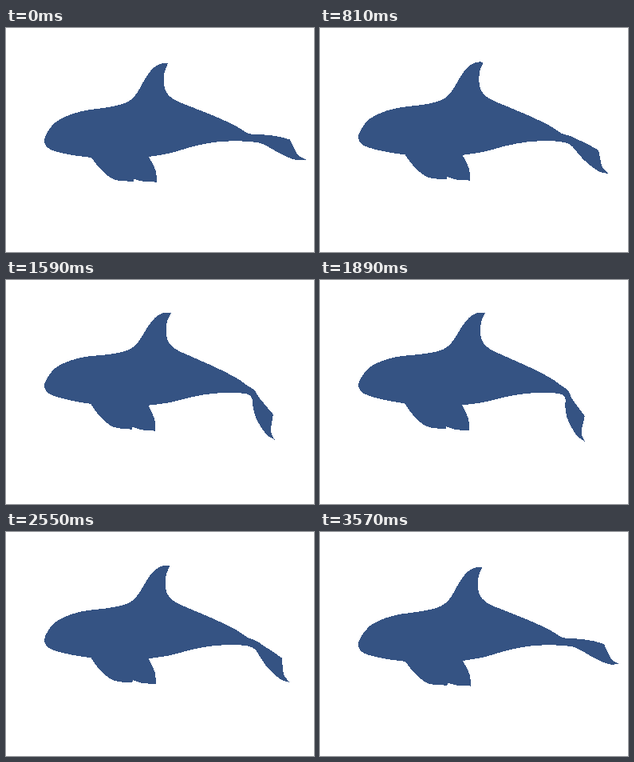
Animation of 386x280 px, one loop 3600 ms. Source, as an HTML page:

```html
<!DOCTYPE html>
<html lang="en">
<head>
<meta charset="utf-8">
<title>Swimming whale</title>
<style>
  html, body { margin: 0; width: 100%; height: 100%; overflow: hidden; background: #fff; }
  svg { display: block; width: 386px; height: 280px; }
</style>
</head>
<body>
<svg viewBox="0 0 386 280"><path id="whale" fill="#355383" shape-rendering="crispEdges"/></svg>
<script>
const LOOP = 3600;

// Key points at rest. Each run is smooth and ends at the corner where the next one starts.
const RUNS = [
  // fin, head and chin
  "203,44.3 193,45 183,51.5 174,64 165,80 156,90 143,95.8 122,100 102,102.7 82,107.8 62,118 51,132 48.2,143 56,152 80,158.3",
  // flipper
  "107,162 119,177 136,189.5",
  "159.5,191.8 160,188.5",
  "160,188.5 172,191.8",
  "189,192.6 187.5,178",
  // belly and underside of the tail
  "179,161 205,156.5 235,148 260,143 285,141.3 303,142 317,143.5 327,147.5 340,155 352,161 364,165",
  // fluke edge
  "375.7,164.5 366,159 361,150",
  // tail and back
  "356,139.5 342,135.8 328,133.8 316,133 303,131.5 288,122.5 262,110.5 232,98.5 210,89 199.5,77 198.2,58"
].map(run => run.split(" ").map(point => point.split(",").map(Number)));

function smoothstep(from, to, x) {
  const k = Math.min(1, Math.max(0, (x - from) / (to - from)));
  return k * k * (3 - 2 * k);
}

function rotate([x, y], [px, py], angle) {
  const c = Math.cos(angle), s = Math.sin(angle), dx = x - px, dy = y - py;
  return [px + dx * c - dy * s, py + dx * s + dy * c];
}

// The body tilts slightly while the tail swings down; the joint blends both turns.
function pose(point, u) {
  const weight = smoothstep(296, 336, point[0]);
  const tilt = 0.0436 * u;
  const swing = u * (0.445 + 0.274 * u);
  return rotate(rotate(point, [290, 140], tilt * (1 - weight)), [300, 120], swing * weight);
}

// Catmull-Rom spline as cubic Béziers.
function spline(p) {
  let d = "";
  for (let i = 0; i < p.length - 1; i++) {
    const a = p[i - 1] || p[i], b = p[i], c = p[i + 1], e = p[i + 2] || c;
    const h1 = b.map((v, k) => v + (c[k] - a[k]) / 6);
    const h2 = c.map((v, k) => v - (e[k] - b[k]) / 6);
    d += `C${h1} ${h2} ${c}`;
  }
  return d;
}

function outline(u) {
  const runs = RUNS.map(run => run.map(point => pose(point, u)));
  const curves = runs.map((run, i) => spline([...run, runs[(i + 1) % runs.length][0]]));
  return `M${runs[0][0]}${curves.join("")}Z`;
}

const whale = document.getElementById("whale");

function draw() {
  const phase = performance.now() % LOOP / LOOP;
  whale.setAttribute("d", outline(1 - Math.abs(1 - 2 * phase)));
  requestAnimationFrame(draw);
}
draw();
</script>
</body>
</html>
```
